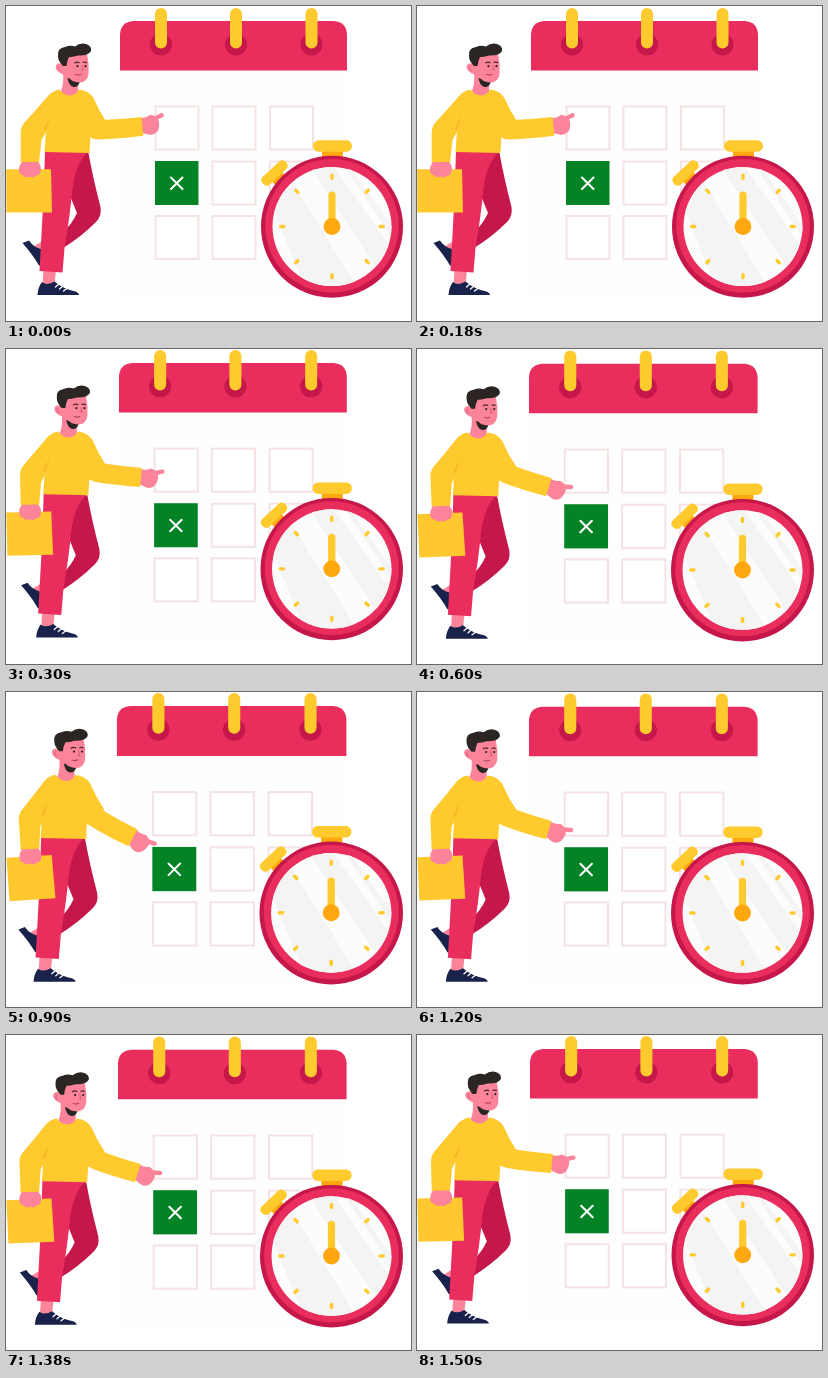
An HTML page that plays this animation: 405x315 px, repeating every 1800 ms.

```html
<!DOCTYPE html>
<html lang="en">
<head>
<meta charset="utf-8">
<title>Calendar and stopwatch</title>
<style>
  @property --k { syntax: "<number>"; inherits: true; initial-value: 0; }
  @property --dy { syntax: "<number>"; inherits: true; initial-value: 0; }

  html, body { margin: 0; width: 100%; height: 100%; overflow: hidden; background: #fff; }
  svg { display: block; width: 100%; height: 100%; animation: sway 1800ms step-end infinite; }

  /* four held poses, there and back */
  @keyframes sway {
    0%, 100% { --k: 0; --dy: 0; }
    16.6667% { --k: 1; --dy: -.9; }
    33.3333% { --k: 2; --dy: 0; }
    50% { --k: 3; --dy: -.4; }
    66.6667% { --k: 2; --dy: 0; }
    83.3333% { --k: 1; --dy: -.9; }
  }

  .scene {
    transform-origin: 397px 100px;
    transform: translateY(calc(var(--dy) * 1px))
               scale(calc(1 + var(--k) * .0036), calc(1 + var(--k) * .002));
  }
  .bag-arm {
    transform-origin: 43px 92px;
    transform: rotate(calc(var(--k) * -1.2deg));
  }
  .forearm { transform: translate(90px, 122px) rotate(calc(-2deg + var(--k) * 11deg)); }
  .hand {
    transform-origin: 46px 0;
    transform: rotate(calc(var(--k) * 4deg));
  }

  .pink { fill: #e92e5e; }
  .wine { fill: #c5174a; }
  .gold { fill: #ffca2d; }
  .amber { fill: #ffa70f; }
  .skin { fill: #fb849b; }
  .dark { fill: #2b2524; }
  .navy { fill: #19224a; }
  .cell { fill: #fff; stroke: #f5e3e3; stroke-width: 2; }
  .line { fill: none; stroke-linecap: round; stroke-linejoin: round; }
</style>
</head>
<body>
<svg viewBox="0 0 405 315">
  <defs>
    <g id="ring">
      <circle class="wine" cy="38.5" r="11"/>
      <rect class="gold" x="-6" y="2" width="12" height="40.5" rx="6"/>
    </g>
    <rect id="cell" class="cell" width="43" height="43"/>
    <rect id="tick" class="gold" x="-1.7" y="-53" width="3.4" height="6.5" rx="1.7"/>
    <clipPath id="face"><circle cx="326" cy="220.5" r="59.5"/></clipPath>
  </defs>

  <g class="scene">
    <!-- calendar -->
    <rect x="114" y="60" width="227" height="230" fill="#fefefe"/>
    <path class="pink" d="M114 64.5V28Q115 16 127 15H328Q340 16 341 28V64.5Z"/>
    <use href="#ring" x="155"/>
    <use href="#ring" x="230"/>
    <use href="#ring" x="305.5"/>
    <use href="#cell" x="149.5" y="100.5"/>
    <use href="#cell" x="206.5" y="100.5"/>
    <use href="#cell" x="264" y="100.5"/>
    <use href="#cell" x="206.5" y="155.5"/>
    <use href="#cell" x="264" y="155.5"/>
    <use href="#cell" x="149.5" y="210"/>
    <use href="#cell" x="206.5" y="210"/>
    <rect x="149" y="155" width="43.5" height="44" fill="#048326"/>
    <path class="line" stroke="#fff" stroke-width="2" d="M165 171.5l11.5 11.5m0-11.5L165 183"/>

    <!-- stopwatch -->
    <rect class="amber" x="316" y="144" width="21" height="10"/>
    <rect class="gold" x="307" y="134.3" width="39" height="11.4" rx="5.5"/>
    <g transform="translate(268 167.5) rotate(-43)">
      <rect class="amber" x="-7" y="3" width="14" height="9"/>
      <rect class="gold" x="-15" y="-5.2" width="31.5" height="10.4" rx="4.5"/>
    </g>
    <circle class="wine" cx="326" cy="220.7" r="71"/>
    <circle class="pink" cx="326" cy="219.8" r="66.8"/>
    <circle cx="326" cy="220.5" r="59.5" fill="#fcfcfc"/>
    <g clip-path="url(#face)" fill="#f4f4f5">
      <path d="M262 190L284 172L352 282L300 284Z"/>
      <path d="M302 158L326 158L392 252L374 268Z"/>
      <path d="M337 158L342 158L394 232L392 240Z"/>
    </g>
    <g transform="translate(326 220.5)">
      <use href="#tick"/>
      <use href="#tick" transform="rotate(45)"/>
      <use href="#tick" transform="rotate(90)"/>
      <use href="#tick" transform="rotate(135)"/>
      <use href="#tick" transform="rotate(180)"/>
      <use href="#tick" transform="rotate(225)"/>
      <use href="#tick" transform="rotate(270)"/>
      <use href="#tick" transform="rotate(315)"/>
      <rect class="gold" x="-3.6" y="-35" width="7.2" height="33" rx="3.5"/>
      <circle class="amber" r="8.4"/>
    </g>

    <!-- legs -->
    <path class="skin" d="M27 241L38 234L44 246L33 251Z"/>
    <path class="navy" d="M16.5 237L23 234.5Q27 241 35 243L38 261L33 259.5Q27 249 16.5 237Z"/>
    <path class="wine" d="M60 147H82.5Q87 172 94.5 201Q96 210 90 216Q75 231 57 242L46 241L58 225Q66 218 71 207L60 180Z"/>
    <path class="skin" d="M37.5 264H50L48.5 279H36.5Z"/>
    <path class="navy" d="M31.5 289Q32 281 36 276Q41 280 48.5 275.5Q57 283 69.5 285.5Q73 287 73 289Z"/>
    <path class="line" stroke="#fff" stroke-width="1.3" d="M49.5 281l4-3.5M53.5 283l4-3.5M57.5 285l4-3"/>
    <path class="pink" d="M39 145H83Q70 156 66.5 182Q64 210 58.5 242L56.5 266.5L33.5 265Q36 220 37.5 190Z"/>

    <!-- head -->
    <path class="skin" d="M57 68H72V86Q68 92 63 91Q57 90 55 85Q58 78 57 68Z"/>
    <path class="dark" d="M61.5 72L74 75Q72.5 81.5 67.5 81Q62.5 79.5 61.5 72Z"/>
    <path class="skin" d="M58 48H81Q83.5 58 82.5 68Q81 76.5 74 76.5Q65 76.5 60.5 69Q55 68.5 51.5 65Q48 61 51 58Q54 56 57 59Z"/>
    <path class="dark" d="M57 60Q52 55 52 50Q51 42 59 41Q64 39 69 40.5Q74 36.5 80 38Q86 40 85 45Q82 50 72 49.5Q66 51 63 51Q61 55 60.5 60Z"/>
    <g class="line" stroke="#49282f" stroke-width="1.3">
      <path d="M68.8 56.8q2.2-1.3 4.2-.2M77.3 56.4q1.8-.8 3.2 .2"/>
      <path stroke="#a53d52" stroke-width="1" d="M69.5 68.5q3 1.4 5.5-.2"/>
      <path stroke="#d95c76" stroke-width="1" d="M76 59.5l1.3 4.5h-2M53 60.5q-2 1.5 1 4"/>
    </g>
    <circle class="dark" cx="71.5" cy="60.2" r="1.1"/>
    <circle class="dark" cx="79.5" cy="60.2" r="1.1"/>

    <!-- torso -->
    <path class="gold" d="M53.5 83.5Q57 89 64 89.5Q70 89 73 83.5Q82 84 86 91L91 106L85 118L83.5 147L38.5 146L40.5 116L43 92Q46 85 53.5 83.5Z"/>

    <!-- arm with the bag -->
    <g class="bag-arm">
      <path class="gold" d="M53.5 84Q46 85 42 90Q30 104 18 117Q14.7 121 14.7 127V156.5L33 157L35.5 134L46 115Z"/>
      <path fill="#f3b828" d="M45 109L37.5 123L40 124Z"/>
      <path fill="#ffc82f" d="M.2 163.3H45L46 206.5H.4Z"/>
      <path class="skin" d="M16 156H32Q36 160 34.5 165Q34 170 30 169.5Q27 173 23.5 170.5Q19 172.5 17 169Q13 169 13 164Q13 159 16 156Z"/>
    </g>

    <!-- pointing arm -->
    <path class="gold" d="M76 85Q84 86 87.5 92Q93 105 101 117L98 126L81 126L74 110Z"/>
    <g class="forearm">
      <g class="hand">
        <path class="line" stroke="#fb849b" stroke-width="4.4" d="M54-5L66-10.5"/>
        <path class="skin" d="M44-8Q50-8 54-11Q60-11 63-5Q64 2 61 6Q57 10 51 8L44 6Z"/>
      </g>
      <path class="gold" d="M-3-11L10-8Q28-8 46-9.5L47 9.5Q22 12 2 11.5Q-8 11-11 2Q-11-8-3-11Z"/>
    </g>
  </g>
</svg>
</body>
</html>
```
